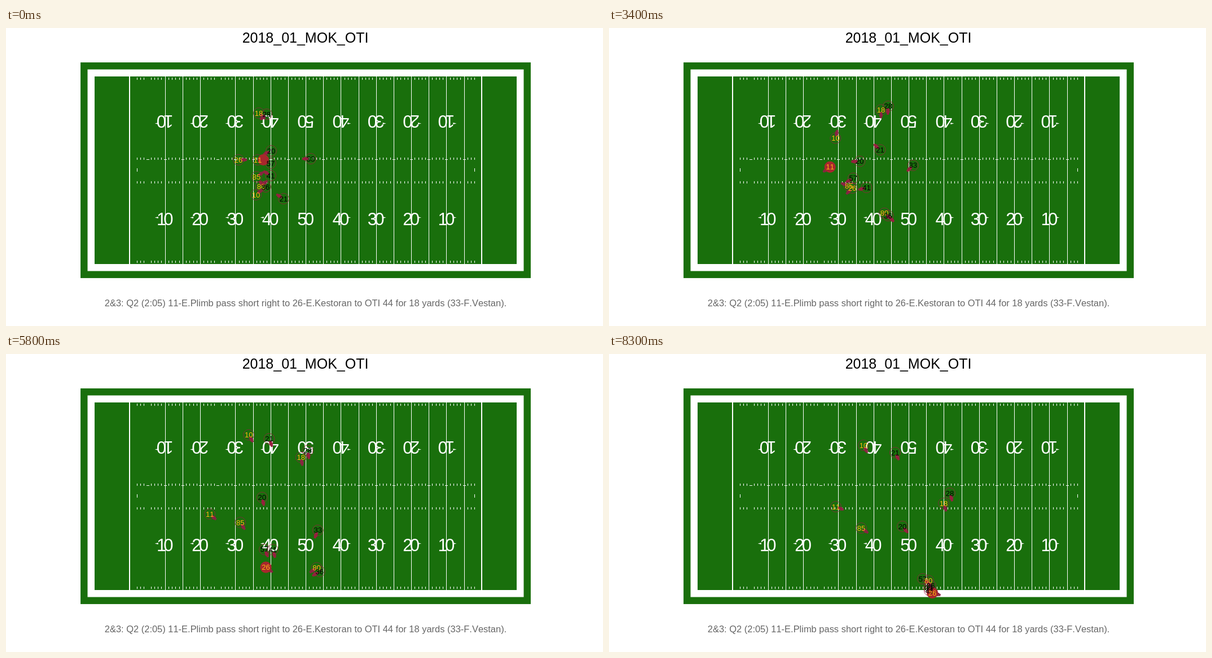
Animation of 1058x529 px, one loop 8.4 s. Source, as an HTML page with a canvas:

```html
<!DOCTYPE html>
<html lang="en">
<head>
<meta charset="utf-8">
<title>Play replay</title>
<style>
html, body { margin: 0; width: 100%; height: 100%; overflow: hidden; background: #fff; }
canvas { display: block; width: 1058px; height: 529px; }
</style>
</head>
<body>
<canvas id="stage" width="1058" height="529"></canvas>
<script>
const LOOP = 8400, STEP = 100, END = LOOP - STEP;
const SNAP = 900, THROW = 3700, CATCH = 4700;
const GREEN = '#196f0c', BALL = '#a8282c';
const FONT = '"Liberation Sans", Arial, sans-serif';
const YARD = 6.233, GOAL = 219.4, TOP = 86, BOTTOM = 419;
const HOME = { text: '#000', mark: '#97203f', forward: -1 };
const AWAY = { text: '#ffb612', mark: '#8a2442', forward: 1 };

const stage = document.getElementById('stage');
const ctx = stage.getContext('2d');
const field = document.createElement('canvas');
field.width = stage.width;
field.height = stage.height;

const mix = (a, b, u) => a + (b - a) * u;
const mixPoint = (p, q, u) => ({ x: mix(p.x, q.x, u), y: mix(p.y, q.y, u) });

// Smooth curve that leaves its first point from rest.
function curve(times, values, t) {
  const last = times.length - 1;
  if (t <= times[0]) return values[0];
  if (t >= times[last]) return values[last];
  const slope = k => {
    if (k === 0) return 0;
    const next = Math.min(k + 1, last);
    return (values[next] - values[k - 1]) / (times[next] - times[k - 1]);
  };
  const i = times.findIndex(time => time > t) - 1;
  const h = times[i + 1] - times[i], u = (t - times[i]) / h;
  return mix(values[i], values[i + 1], u * u * (3 - 2 * u))
    + h * u * (1 - u) * ((1 - u) * slope(i) - u * slope(i + 1));
}

// A run from its start through four waypoints shared in time by all runners.
function route(start, ...points) {
  const times = [start, 2700, CATCH + 200, 6700, END];
  const xs = points.map(p => p[0]), ys = points.map(p => p[1]);
  return t => ({ x: curve(times, xs, t), y: curve(times, ys, t) });
}

// A defender who stays close to a receiver while the gap slowly turns.
function shadow(leader, from, to) {
  return t => {
    const p = leader(t), u = t / END;
    return { x: p.x + mix(from[0], to[0], u), y: p.y + mix(from[1], to[1], u) };
  };
}

const passer = route(SNAP, [446, 234], [409, 236], [360, 275], [372, 287], [402, 271]);
const runner = route(SNAP, [412, 234], [432, 259], [432, 348], [500, 403], [573, 424]);
const wideLeft = route(SNAP, [448, 151], [471, 143], [508, 160], [541, 213], [593, 265]);
const wideRight = route(SNAP, [452, 281], [469, 311], [535, 368], [560, 387], [566, 402]);

const players = [
  [28, HOME, shadow(wideLeft, [14, 2], [11, -18])],
  [20, HOME, route(SNAP, [470, 218], [447, 237], [447, 236], [468, 278], [520, 306])],
  [57, HOME, route(SNAP, [469, 240], [437, 251], [438, 312], [488, 379], [556, 399])],
  [33, HOME, route(SNAP, [540, 232], [533, 236], [555, 274], [550, 357], [567, 415])],
  [41, HOME, route(SNAP, [469, 262], [460, 271], [456, 319], [500, 377], [568, 420])],
  [21, HOME, route(0, [492, 303], [488, 242], [463, 160], [477, 153], [507, 175])],
  [18, AWAY, wideLeft],
  [85, AWAY, route(SNAP, [444, 264], [432, 275], [413, 292], [423, 305], [447, 309])],
  [80, AWAY, wideRight],
  [36, HOME, shadow(wideRight, [8, 1], [4, 9])],
  [10, AWAY, route(0, [443, 296], [400, 220], [419, 148], [441, 149], [451, 162])],
  [11, AWAY, passer],
  [26, AWAY, runner],
].map(([number, team, place]) => ({ number, team, place }));

function ballPlace(t) {
  if (t >= CATCH) return runner(t);
  if (t > THROW) return mixPoint(passer(THROW), runner(CATCH), (t - THROW) / (CATCH - THROW));
  const p = passer(t);
  return { x: p.x + 10 * Math.max(0, 1 - t / 1300), y: p.y };
}

// Players look along their run and toward the ball; before the snap also upfield.
function facing({ team, place }, ball, t) {
  const p = place(t), a = place(t - 50), b = place(t + 50);
  const gap = Math.max(Math.hypot(ball.x - p.x, ball.y - p.y), 20);
  const set = Math.max(0, 1 - t / 2000);
  const x = (b.x - a.x) * 0.4 + (ball.x - p.x) / gap + team.forward * set;
  const y = (b.y - a.y) * 0.4 + (ball.y - p.y) / gap;
  return Math.atan2(y, x);
}

function label(g, text, x, y, size, color) {
  g.font = `${size}px ${FONT}`;
  g.fontKerning = 'none';
  g.textAlign = 'center';
  g.fillStyle = color;
  g.fillText(text, x, y);
}

function yardNumber(g, value, x, y, turn) {
  g.save();
  g.translate(x, y);
  g.rotate(turn);
  label(g, value / 10, -YARD, 11, 31, '#fff');
  label(g, 0, YARD, 11, 31, '#fff');
  g.restore();
}

function pointer(g, x, y, side) {
  g.beginPath();
  g.moveTo(x + side * 18, y);
  g.lineTo(x + side * 12, y - 1.5);
  g.lineTo(x + side * 12, y + 1.5);
  g.fill();
}

function drawField(g) {
  const box = (color, x, y, w, h) => { g.fillStyle = color; g.fillRect(x, y, w, h); };
  const yardX = yard => Math.round(GOAL + yard * YARD);
  const frameBox = (color, margin) => {
    const m = margin * YARD;
    box(color, 157 - m, TOP - m, 748 + 2 * m, BOTTOM - TOP + 2 * m);
  };
  box('#fff', 0, 0, stage.width, stage.height);
  frameBox(GREEN, 4);
  frameBox('#fff', 2);
  frameBox(GREEN, 0);

  for (let yard = 2; yard < 99; yard++) {
    const x = yardX(yard);
    if (yard % 5) {
      for (const y of [88, 230, 272, 413]) box('#fff', x, y, 1, 4);
    } else {
      if (yard !== 5 && yard !== 25) box('#fff', x, TOP, 1, BOTTOM - TOP);
      box('#fff', x - 2, 233, 5, 1);
    }
  }
  for (const yard of [0, 100]) box('#fff', yardX(yard) - 1, TOP, 2, BOTTOM - TOP);
  for (const yard of [2, 98]) box('#fff', yardX(yard), 249, 1, 6);

  for (let yard = 10; yard <= 90; yard += 10) {
    const x = GOAL + yard * YARD, side = Math.sign(yard - 50);
    const value = Math.min(yard, 100 - yard);
    yardNumber(g, value, x, 339, 0);
    yardNumber(g, value, x, 166, Math.PI);
    if (side) {
      pointer(g, x, 336.5, side);
      pointer(g, x, 169.5, side);
    }
  }
  label(g, '2018_01_MOK_OTI', 530.5, 26, 25, '#000');
  label(g, '2&3: Q2 (2:05) 11-E.Plimb pass short right to 26-E.Kestoran to OTI 44 for 18 yards (33-F.Vestan).',
    531, 494, 16.47, '#666');
}

function disc(g, x, y, radius) {
  g.beginPath();
  g.arc(x, y, radius, 0, 2 * Math.PI);
}

function drawMark({ team, place }, angle, t) {
  const { x, y } = place(t);
  ctx.strokeStyle = ctx.fillStyle = team.mark;
  ctx.lineWidth = 0.8;
  disc(ctx, x, y, 9.5);
  ctx.stroke();

  ctx.save();
  ctx.translate(x, y);
  ctx.rotate(angle);
  ctx.fillRect(4, -2.5, 8, 5);
  ctx.fillRect(8, -3, 4, 6);
  ctx.fillRect(12, -2, 3, 4);
  ctx.restore();
}

function draw(t) {
  ctx.drawImage(field, 0, 0);
  const ball = ballPlace(t);
  for (const p of players) drawMark(p, facing(p, ball, t), t);
  ctx.fillStyle = BALL;
  disc(ctx, ball.x, ball.y, 10);
  ctx.fill();
  for (const { number, team, place } of players) {
    const { x, y } = place(t);
    label(ctx, number, x, y + 4.5, 13, team.text);
  }
}

function frame() {
  const t = performance.now() % LOOP;
  draw(Math.floor(t / STEP) * STEP);
  requestAnimationFrame(frame);
}

drawField(field.getContext('2d'));
frame();
</script>
</body>
</html>
```
